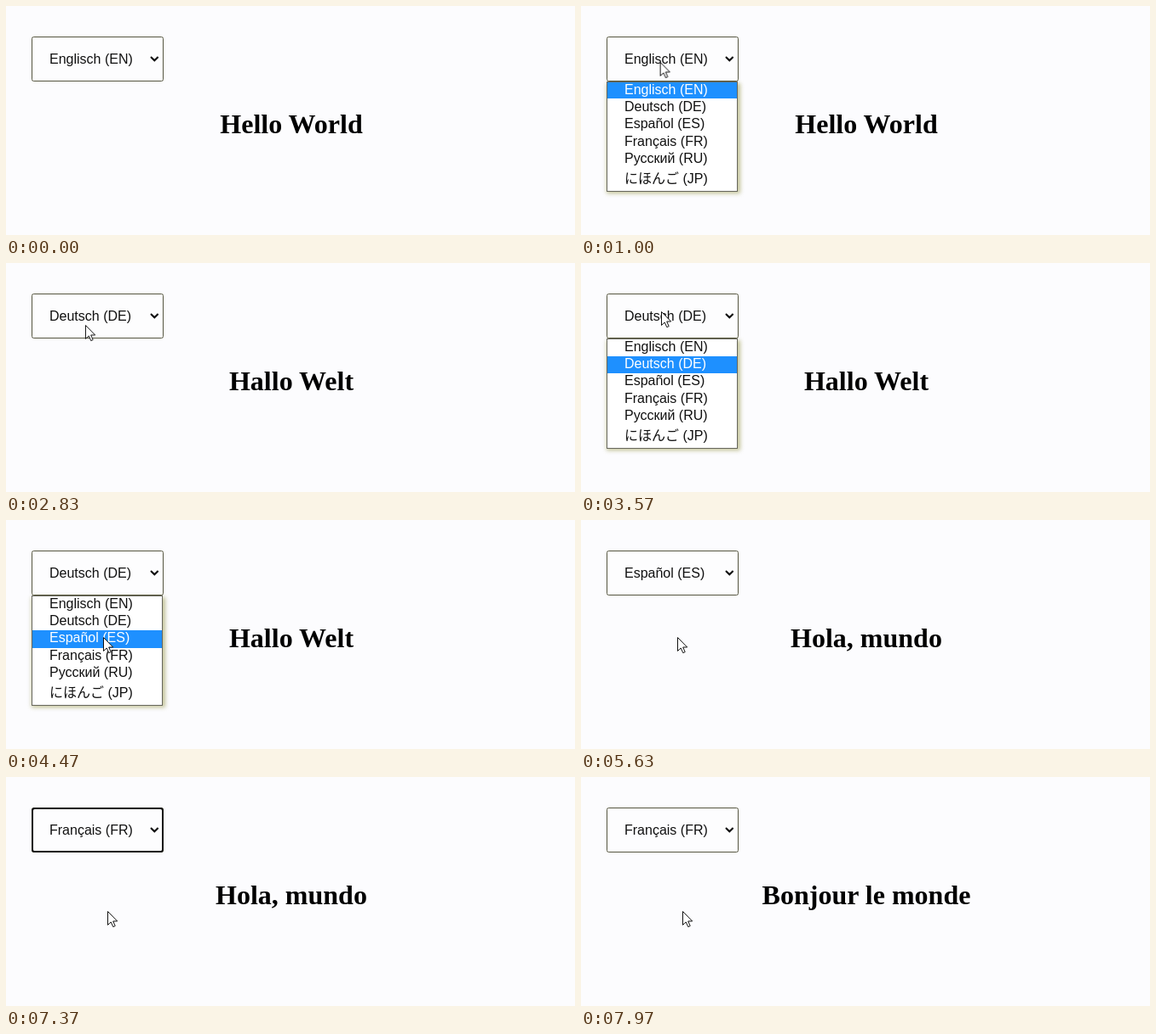
Animation of 668 by 270 pixels, one loop 8 s. Source, as an HTML page:

```html
<!DOCTYPE html>
<html lang="de">
<head>
<meta charset="utf-8">
<title>Language picker</title>
<style>
  html, body { margin: 0; width: 100%; height: 100%; overflow: hidden; background: #fcfcfe; }
  svg { display: block; width: 668px; height: 270px; }
  text { white-space: pre; }
  .ui { font: 16px "Liberation Sans", Arial, "Noto Sans CJK JP", "Noto Sans CJK", sans-serif; }
  .kana { font-weight: 300; }
  .title { font: bold 32px "Liberation Serif", "Times New Roman", serif; text-anchor: middle; }

  .labels, .titles, .ring, .hot { animation: 8s step-end infinite; }
  .labels { animation-name: labels; }
  .titles { animation-name: titles; }
  .ring { animation-name: ring; }
  .hot { animation-name: hot; }
  .menu { animation: menu 8s linear infinite; }
  .shadow { filter: blur(2.5px); }
  .cursor { animation: cursor 8s ease-in-out infinite; }

  /* Strips of text, one line every 100px */
  @keyframes labels {
    0% { transform: translateY(0); }
    25.375% { transform: translateY(-100px); }
    60.875% { transform: translateY(-200px); }
    91.625%, 100% { transform: translateY(-300px); }
  }
  @keyframes titles {
    0% { transform: translateY(0); }
    31.625% { transform: translateY(-100px); }
    66.625% { transform: translateY(-200px); }
    96.625%, 100% { transform: translateY(-300px); }
  }
  /* Focus ring, from choice until reload */
  @keyframes ring {
    0%, 31.625%, 66.625%, 96.625%, 100% { opacity: 0; }
    25.375%, 60.875%, 91.625% { opacity: 1; }
  }
  @keyframes menu {
    0%, 2.875% { opacity: 0; }
    4%, 25.37% { opacity: 1; }
    25.375%, 43.75% { opacity: 0; }
    44.5%, 60.87% { opacity: 1; }
    60.875%, 81.25% { opacity: 0; }
    82%, 91.62% { opacity: 1; }
    91.625%, 100% { opacity: 0; }
  }
  /* Highlighted row */
  @keyframes hot {
    0%, 52%, 87.25% { clip-path: inset(0 0 109px 0); }
    17%, 53%, 88.1% { clip-path: inset(20px 0 88px 0); }
    54.1%, 77%, 89.1% { clip-path: inset(40px 0 67px 0); }
    43%, 44% { clip-path: inset(20px 0 88px 0); }
    90.25%, 100% { clip-path: inset(61px 0 47px 0); }
  }
  @keyframes cursor {
    0%, .3% { transform: translate(93px, 58px); opacity: 0; }
    .375%, 10.375% { transform: translate(93px, 58px); opacity: 1; }
    18.75%, 31.625% { transform: translate(90px, 116px); }
    37.5%, 49.625% { transform: translate(94px, 57px); }
    55.25% { transform: translate(114px, 138px); }
    62%, 70.6% { transform: translate(113px, 138px); }
    79.5%, 86.75% { transform: translate(108px, 70px); animation-timing-function: linear; }
    87.5% { transform: translate(110px, 98px); animation-timing-function: linear; }
    90.6%, 100% { transform: translate(119px, 158px); opacity: 1; }
  }
</style>
</head>
<body>
<svg viewBox="0 0 668 270">
  <defs>
    <clipPath id="boxClip"><rect x="30" y="36" width="155" height="53"/></clipPath>
    <clipPath id="titleClip"><rect x="195" y="110" width="300" height="60"/></clipPath>
    <g id="rows" class="ui">
      <text x="51" y="104">Englisch (EN)</text>
      <text x="51" y="124">Deutsch (DE)</text>
      <text x="51" y="144">Español (ES)</text>
      <text x="51" y="165">Français (FR)</text>
      <text x="51" y="185">Русский (RU)</text>
      <text x="51" y="209" class="kana">にほんご (JP)</text>
    </g>
  </defs>

  <g clip-path="url(#titleClip)">
    <g class="titles title">
      <text x="335" y="150">Hello World</text>
      <text x="335" y="250">Hallo Welt</text>
      <text x="335" y="350">Hola, mundo</text>
      <text x="335" y="450">Bonjour le monde</text>
    </g>
  </g>

  <rect x="30.5" y="36.5" width="154" height="52" rx="2" fill="#fdfdfe" stroke="#55553f"/>
  <rect class="ring" x="31" y="37" width="153" height="51" rx="2.5" fill="none" stroke="#0c0c08" stroke-width="2"/>
  <g clip-path="url(#boxClip)">
    <g class="labels ui" fill="#111">
      <text x="51" y="68">Englisch (EN)</text>
      <text x="51" y="168">Deutsch (DE)</text>
      <text x="51" y="268">Español (ES)</text>
      <text x="51" y="368">Français (FR)</text>
    </g>
  </g>
  <path d="M170 60l4.3 4.3 4.3-4.3" fill="none" stroke="#000" stroke-width="2"/>

  <g class="menu">
    <rect class="shadow" x="30" y="91" width="157" height="130" fill="#8a8a30" opacity=".5"/>
    <rect x="30.5" y="89.5" width="153" height="129" fill="#fff" stroke="#66665c"/>
    <use href="#rows" fill="#111"/>
    <g class="hot">
      <rect x="31" y="90" width="152" height="128" fill="#1e90ff"/>
      <use href="#rows" fill="#fff"/>
    </g>
  </g>

  <g class="cursor">
    <path d="M.5 .5V16.5L4.2 13 6.8 18.7 9.2 17.6 6.7 12H11.7Z" fill="#fff" stroke="#111"/>
  </g>
</svg>
</body>
</html>
```
